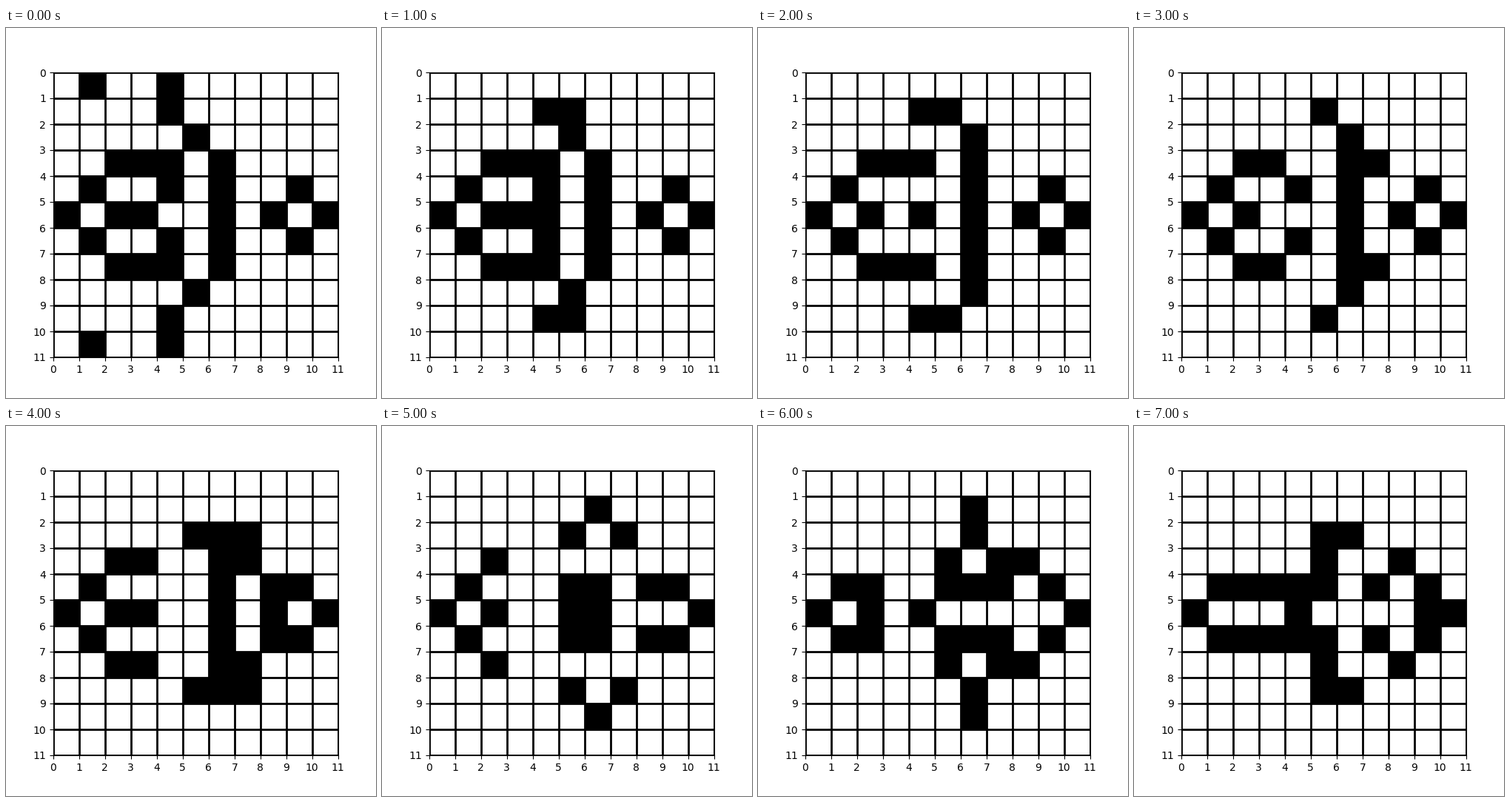
Recreate the animation shown at these times as a matplotlib script. Size 500 px wide and 500 px high, loop 8 s.

```python
import matplotlib.pyplot as plt
import numpy as np
from matplotlib.animation import FuncAnimation

SIZE = 11
GENERATIONS = 8

# Upper half and middle row of the starting pattern; the rest is its mirror.
HALF = [
    ".#..#......",
    "....#......",
    ".....#.....",
    "..###.#....",
    ".#..#.#..#.",
    "#.##..#.#.#",
]


def first_board():
    rows = HALF + HALF[-2::-1]
    return np.array([[int(c == "#") for c in row] for row in rows])


def step(board):
    """One Game of Life generation with dead cells beyond the border."""
    padded = np.pad(board, 1)
    near = sum(
        padded[r:r + SIZE, c:c + SIZE] for r in range(3) for c in range(3)
    ) - board
    return ((near == 3) | ((board == 1) & (near == 2))).astype(int)


boards = [first_board()]
while len(boards) < GENERATIONS:
    boards.append(step(boards[-1]))

fig, ax = plt.subplots(figsize=(5, 5), dpi=100)
image = ax.imshow(boards[0], cmap="binary", vmin=0, vmax=1,
                  interpolation="nearest", extent=(0, SIZE, SIZE, 0))
ax.set_xticks(range(SIZE + 1))
ax.set_yticks(range(SIZE + 1))
ax.grid(color="black", linewidth=2)


def update(i):
    image.set_data(boards[i])
    return [image]


anim = FuncAnimation(fig, update, frames=GENERATIONS, interval=1000,
                     repeat=True, repeat_delay=0)
plt.show()
```
